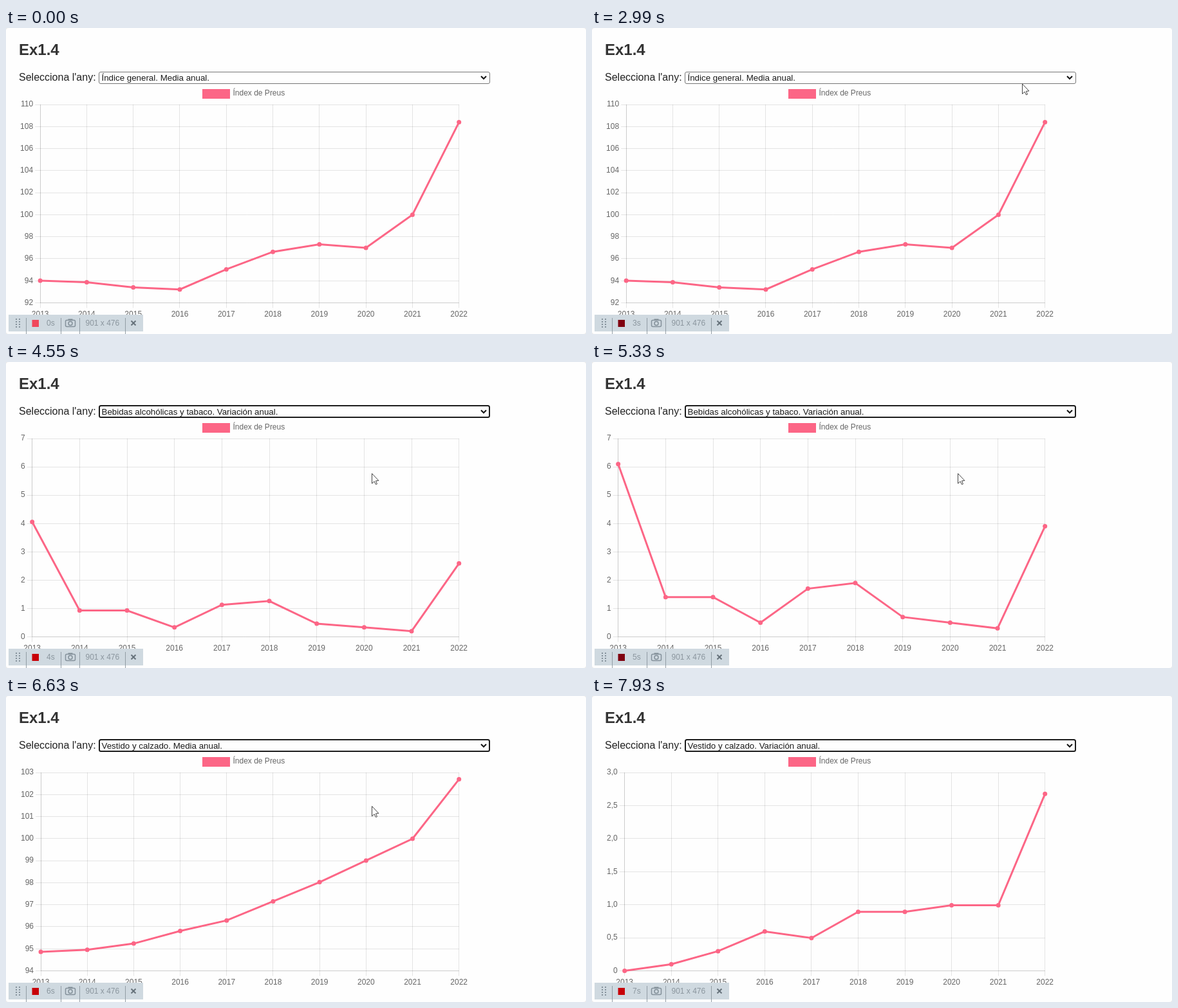
An HTML page with a canvas that plays this animation: 901x476 px, repeating every 8 s.

```html
<!DOCTYPE html>
<html lang="ca">
<head>
<meta charset="utf-8">
<title>Ex1.4</title>
<style>
html, body { margin: 0; width: 100%; height: 100%; overflow: hidden; background: #fefefe; }
canvas { display: block; width: 100%; height: 100%; }
</style>
</head>
<body>
<canvas id="stage" width="901" height="476"></canvas>
<script>
const ctx = document.getElementById('stage').getContext('2d');
const LOOP = 8000, STEP = 130;
const FONT = '"Liberation Sans", Arial, sans-serif';
const PINK = 'rgb(252,102,134)';
const TOP = 119, BOTTOM = 427.5, RIGHT = 703.7;

const clamp = v => Math.max(0, Math.min(1, v));
const outQuart = v => 1 - Math.pow(1 - clamp(v), 4);
const crisp = v => Math.floor(v) + 0.5;

// Yearly change in percent, 2013 to 2022
const general = [0, -0.15, -0.5, -0.2, 1.96, 1.67, 0.7, -0.32, 3.1, 8.39];
const drinks = [6.1, 1.4, 1.4, 0.5, 1.7, 1.9, 0.7, 0.5, 0.3, 3.9];
const clothes = [0, 0.1, 0.3, 0.6, 0.5, 0.9, 0.9, 1, 1, 2.7];

// Price index built up from yearly changes, with 2021 as 100
function indexOf(rates) {
  let level = 1;
  const levels = rates.map(r => level *= 1 + r / 100);
  return levels.map(v => 100 * v / levels[8]);
}

// Axis step is the next 1, 2 or 5 above a tenth of the range
function makeChart(start, option, data) {
  const low = Math.min(...data), high = Math.max(...data);
  const raw = (high - low) / 10;
  const unit = 10 ** Math.floor(Math.log10(raw));
  const tick = unit * [1, 2, 5, 10].find(n => n * unit >= raw);
  const min = Math.floor(low / tick) * tick, max = Math.ceil(high / tick) * tick;
  const format = v => v ? v.toFixed(tick < 1 ? 1 : 0).replace('.', ',') : '0';
  ctx.font = `12px ${FONT}`;
  const left = 34 + ctx.measureText(format(max)).width;
  return { start, option, data, min, max, tick, format, left };
}

const charts = [
  makeChart(-2000, 'Índice general. Media anual.', indexOf(general)),
  makeChart(4311, 'Bebidas alcohólicas y tabaco. Variación anual.', drinks),
  makeChart(5808, 'Vestido y calzado. Media anual.', indexOf(clothes)),
  makeChart(7237, 'Vestido y calzado. Variación anual.', clothes)
];

const POINTER_IN = 260, POINTER_OUT = 7280;
const moves = [
  { at: POINTER_IN, time: 650, x: 668, y: 79 },
  { at: 1950, time: 260, x: 668, y: 87 },
  { at: 4030, time: 260, x: 568, y: 173.5 },
  { at: 5590, time: 130, x: 568, y: 171.5 }
];

function text(str, x, y, size, color, align = 'left', base = 'alphabetic', weight = '') {
  ctx.font = `${weight} ${size}px ${FONT}`;
  ctx.fillStyle = color;
  ctx.textAlign = align;
  ctx.textBaseline = base;
  ctx.fillText(str, x, y);
}

function trace(points, closed) {
  ctx.beginPath();
  points.forEach(([x, y]) => ctx.lineTo(x, y));
  if (closed) ctx.closePath();
}

function stroke(points, color, width) {
  trace(points);
  ctx.strokeStyle = color;
  ctx.lineWidth = width;
  ctx.stroke();
}

function rect(x, y, w, h, color) {
  ctx.fillStyle = color;
  ctx.fillRect(x, y, w, h);
}

function frame(x, y, w, h, radius, color, width) {
  ctx.beginPath();
  ctx.roundRect(x, y, w, h, radius);
  ctx.strokeStyle = color;
  ctx.lineWidth = width;
  ctx.stroke();
}

function drawHeader(option, focused) {
  text('Ex1.4', 20, 42, 24, '#333', 'left', 'alphabetic', 'bold');
  text("Selecciona l'any:", 20, 82, 16, '#222');
  if (focused) frame(145, 68, 606, 18, 2.5, '#1c1c1c', 2);
  else frame(144.5, 68.5, 607, 18, 2.5, '#767676', 1);
  text(option, 148.5, 81.5, 13.333, '#1a1a1a');
  stroke([[738, 75], [742, 79], [746, 75]], '#111', 2);
}

function drawGrid(chart, yOf, xOf) {
  const line = 'rgba(0,0,0,0.1)';
  for (let value = chart.min; value <= chart.max; value += chart.tick) {
    const y = yOf(value);
    stroke([[chart.left - 8, crisp(y)], [RIGHT, crisp(y)]], line, 1);
    text(chart.format(value), chart.left - 11, y, 12, '#666', 'right', 'middle');
  }
  chart.data.forEach((_, i) => {
    const x = xOf(i);
    stroke([[crisp(x), TOP], [crisp(x), BOTTOM + 8]], line, 1);
    text(2013 + i, x, 445.5, 12, '#666', 'center', 'middle');
  });
  stroke([[crisp(chart.left), TOP], [crisp(chart.left), BOTTOM]], line, 1);
  stroke([[chart.left, BOTTOM], [RIGHT, BOTTOM]], line, 1);
}

function drawChart(chart, t) {
  const yOf = v => BOTTOM - (v - chart.min) / (chart.max - chart.min) * (BOTTOM - TOP);
  const xOf = i => chart.left + i * (RIGHT - chart.left) / 9;
  rect(305, 95, 43, 15, PINK);
  text('Índex de Preus', 352.5, 102, 12, '#666', 'left', 'middle');
  drawGrid(chart, yOf, xOf);

  const grow = outQuart((t - chart.start) / 1000);
  const points = chart.data.map((v, i) => [xOf(i), BOTTOM + (yOf(v) - BOTTOM) * grow]);
  stroke(points, PINK, 3);
  ctx.fillStyle = PINK;
  for (const [x, y] of points) {
    ctx.beginPath();
    ctx.arc(x, y, 3.5, 0, Math.PI * 2);
    ctx.fill();
  }
}

function drawToolbar(t) {
  const ink = '#8b969e', icon = '#84919a';
  const seconds = Math.floor((t + 150) / 1045);
  const dim = Math.floor((t + 50) / 1600) % 2;
  const lit = t < POINTER_IN ? '#f0485c' : '#c80008';

  rect(4, 446, 209, 26, '#cfd9e0');
  for (const x of [31.5, 85.5, 114.5, 185.5]) stroke([[x, 451], [x, 476]], '#929da5', 1);
  for (let i = 0; i < 8; i++) rect(15 + (i % 2) * 5, 452 + (i >> 1) * 4, 2, 2, icon);
  rect(40.5, 454, 10.5, 11, dim ? '#800010' : lit);
  text(seconds + 's', 63, 463, 12, ink);
  text('901 x 476', 123.5, 463, 12, ink);

  frame(92.5, 454.5, 15, 10, 2, icon, 1.5);
  rect(96.5, 452.5, 7, 2, icon);
  ctx.beginPath();
  ctx.arc(100, 459.5, 3, 0, Math.PI * 2);
  ctx.stroke();

  stroke([[194.5, 455.5], [201.5, 462.5]], '#66727a', 2);
  stroke([[201.5, 455.5], [194.5, 462.5]], '#66727a', 2);
}

function drawPointer(t) {
  if (t < POINTER_IN || t >= POINTER_OUT) return;
  let x = 120, y = 430;
  for (const move of moves) {
    const k = outQuart((t - move.at) / move.time);
    x += (move.x - x) * k;
    y += (move.y - y) * k;
  }
  ctx.save();
  ctx.translate(x + 0.5, y);
  trace([[0, 0], [0, 15.5], [3.6, 12.2], [6, 17], [8, 16.2], [5.9, 11.4], [10.4, 11]], true);
  ctx.fillStyle = '#fff';
  ctx.fill();
  ctx.strokeStyle = '#444';
  ctx.lineWidth = 1;
  ctx.stroke();
  ctx.restore();
}

function draw(t) {
  const chart = charts.filter(c => c.start <= t).pop();
  rect(0, 0, 901, 476, '#e6e6e6');
  ctx.beginPath();
  ctx.roundRect(0, 0, 901, 476, 4);
  ctx.fillStyle = '#fefefe';
  ctx.fill();
  drawHeader(chart.option, t >= 4030);
  drawChart(chart, t);
  drawToolbar(t);
  drawPointer(t);
}

const begin = performance.now();
function loop() {
  const t = (performance.now() - begin) % LOOP;
  draw(Math.floor(t / STEP) * STEP);
  requestAnimationFrame(loop);
}
loop();
</script>
</body>
</html>
```
